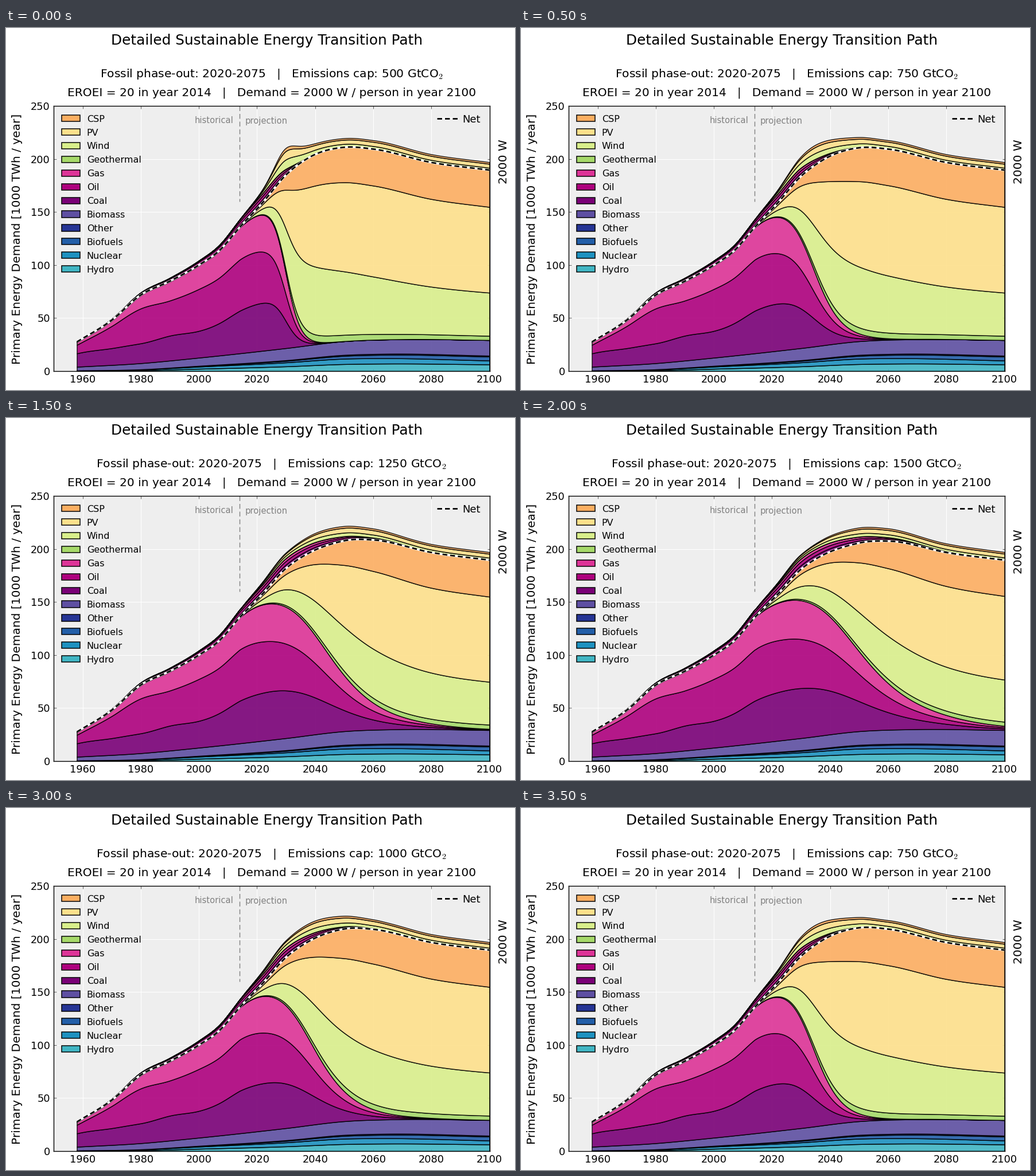
Write a matplotlib script that moves like this. It is 887x632 px and loops after 4000 ms.

```python
import numpy as np
import matplotlib.pyplot as plt
from matplotlib.animation import FuncAnimation
from matplotlib.patches import Rectangle

W, H, DPI = 887, 632, 64
LEFT, RIGHT, TOP, BOTTOM = 83, 842.5, 136, 599

plt.rcParams.update({
    "font.family": "DejaVu Sans",
    "mathtext.fontset": "cm",
    "lines.scale_dashes": False,
    "lines.dash_capstyle": "butt",
})


def px(n):
    """Pixels to points."""
    return n * 72 / DPI


SOURCES = [
    ("Hydro", "#41b6c4"), ("Nuclear", "#1d91c0"), ("Biofuels", "#225ea8"),
    ("Other", "#253494"), ("Biomass", "#5e4fa2"), ("Coal", "#7a0177"),
    ("Oil", "#ae017e"), ("Gas", "#dd3497"), ("Geothermal", "#a6d96a"),
    ("Wind", "#d9ef8b"), ("PV", "#fee08b"), ("CSP", "#fdae61"),
]
COLORS = [c for _, c in SOURCES]

START = 2014
YEARS = np.arange(1958, 2100.1, 0.5)
AHEAD = np.maximum(YEARS - START, 0)


def smooth(points):
    """Cubic Hermite curve through (year, value) points, sampled at YEARS."""
    xs, ys = np.array(points, float).T
    m = np.gradient(ys, xs)
    i = np.clip(np.searchsorted(xs, YEARS, side="right") - 1, 0, len(xs) - 2)
    h = xs[i + 1] - xs[i]
    u = (YEARS - xs[i]) / h
    v = 1 - u
    return (ys[i] * v * v * (1 + 2 * u) + ys[i + 1] * u * u * (3 - 2 * u)
            + h * u * v * (m[i] * v - m[i + 1] * u))


# Net demand and the steady lower sources, in 1000 TWh / year
DEMAND = smooth([(1958, 27.5), (1970, 48), (1980, 71.8), (1990, 84.8),
                 (2000, 100), (2007, 113.5), (2014, 135.5), (2022, 159),
                 (2030, 185), (2038, 201.5), (2050, 211), (2060, 209.3),
                 (2080, 196.7), (2100, 189.5)])
BIO = smooth([(1958, 4), (1980, 7.4), (2000, 12.6), (2030, 21.6),
              (2050, 28.1), (2070, 30), (2100, 29.2)])
OTHER = smooth([(1958, 0.5), (1980, 1.6), (2000, 4.9), (2030, 10.2),
                (2050, 15.2), (2065, 16.3), (2100, 14.5)])
BASE = [0.43 * OTHER, (0.86 - 0.0016 * (YEARS - 1990)) * OTHER,
        0.94 * OTHER, OTHER, BIO]

# Shares within the fossil and within the renewable supply
COAL = smooth([(1958, 0.545), (1970, 0.378), (1980, 0.292), (1990, 0.315),
               (2000, 0.29), (2014, 0.338), (2024, 0.355), (2100, 0.37)])
OIL = smooth([(1958, 0.349), (1970, 0.498), (1980, 0.514), (1990, 0.444),
              (2000, 0.454), (2014, 0.407), (2024, 0.37), (2050, 0.34),
              (2100, 0.31)])
FOSSIL_MIX = [COAL, OIL, 1 - COAL - OIL]

WIND = 0.26 + 0.33 * np.exp(-AHEAD / 30)
CSP = 0.235 - 0.12 * np.exp(-AHEAD / 45)
GEO = 0.09 * WIND
CLEAN_MIX = [GEO, WIND - GEO, 1 - WIND - CSP, CSP]
GEO_COST = 0.04 * WIND
COST_MIX = [GEO_COST, WIND - GEO_COST, 1 - WIND - CSP, CSP]


def fossil_supply(step, net):
    """Growth that levels off, cut by a generalised logistic phase-out."""
    shape = 0.8 - 0.1 * step
    half = 2030 + 4.4 * step + 0.2 * step ** 2
    tail = 2.8 + 3 * step + 0.1 * step ** 2
    width = shape * tail
    middle = half - width * np.log(2 ** (1 / shape) - 1)

    def left(t):
        return (1 + np.exp((t - middle) / width)) ** -shape

    growth = 144.5 - 26 * np.exp(-AHEAD / 11)
    projected = growth * left(YEARS) / left(START)
    history = net - BIO - 0.4
    return np.where(YEARS < START, history, np.minimum(projected, history))


def stack(cap):
    """Tops of the net stack and, above it, of the energy-investment stack."""
    step = (cap - 500) / 250
    dip = 1.75 * step * np.exp(-((YEARS - 2035 - 1.7 * step) / (10 + 1.5 * step)) ** 2)
    net = DEMAND - dip * (YEARS > START)
    fossil = fossil_supply(step, net)
    clean = np.maximum(net - BIO - fossil, 0)

    parts = [s * fossil for s in FOSSIL_MIX] + [s * clean for s in CLEAN_MIX]
    tops = BASE + list(BIO + np.cumsum(parts, axis=0))

    # Running clean plants costs a little, building them costs more.
    build = np.maximum(np.gradient(clean, YEARS), 0)
    build = np.convolve(build, np.ones(7) / 7, "same")
    invest = 0.046 * clean + build
    burn = fossil * np.minimum(0.06 * np.exp((YEARS - START) / 60), 0.077)
    costs = [s * burn for s in FOSSIL_MIX] + [s * invest for s in COST_MIX]
    return tops, net + np.cumsum(costs, axis=0), net


fig = plt.figure(figsize=(W / DPI, H / DPI), dpi=DPI, facecolor="white")
ax = fig.add_axes([LEFT / W, 1 - BOTTOM / H, (RIGHT - LEFT) / W, (BOTTOM - TOP) / H],
                  facecolor="#eeeeee")
ax.set(xlim=(1950, 2100), ylim=(0, 250),
       xticks=range(1960, 2101, 20), yticks=range(0, 251, 50))
ax.set_axisbelow(True)
ax.grid(color="white", lw=px(1), ls="-")
ax.tick_params(direction="in", top=True, right=True, length=px(4.5),
               width=px(0.6), labelsize=px(17.7), pad=px(6))
for spine in ax.spines.values():
    spine.set_linewidth(px(1.4))


def label(x, y, text, size, ha="left", **kw):
    """Text with its baseline at a pixel position from the top left."""
    return fig.text(x / W, 1 - y / H, text, fontsize=px(size), ha=ha,
                    va="baseline", rotation_mode="anchor", **kw)


def data(x, y):
    """Pixel position to axes data."""
    return (1950 + 150 * (x - LEFT) / (RIGHT - LEFT),
            250 * (BOTTOM - y) / (BOTTOM - TOP))


DASH = (0, (px(8.5), px(5)))


def net_line(xs, ys):
    white = ax.plot(xs, ys, color="white", lw=px(3.8), zorder=5,
                    solid_capstyle="butt")
    black = ax.plot(xs, ys, color="black", lw=px(2.7), ls=DASH, zorder=6)
    return white + black


label(454.5, 29, "Detailed Sustainable Energy Transition Path", 24.75, "center")
subtitle = label(463, 85, "", 20.2, "center")
label(463, 118.5, "EROEI = 20 in year 2014   |   Demand = 2000 W / person in year 2100",
      20.15, "center")
label(25.5, 368, "Primary Energy Demand [1000 TWh / year]", 20.15, "center", rotation=90)
label(873, 233.5, "2000 W", 20.15, "center", rotation=90)
label(396, 166.5, "historical", 14.7, "right", color="#808080")
label(417, 166.5, "projection", 14.7, color="#808080")
ax.plot([START, START], [250, 160], color="#808080", lw=px(1.4), ls=DASH)

for k, (name, color) in enumerate(reversed(SOURCES)):
    y = 163.3 + 23.9 * k
    (x0, y0), (x1, y1) = data(97, y), data(129, y - 11.2)
    ax.add_patch(Rectangle((x0, y0), x1 - x0, y1 - y0, fc=color, ec="black",
                           lw=px(1.5), zorder=4))
    label(140.8, y + 0.3, name, 16)

(x0, y0), (x1, _) = data(751, 158.5), data(787, 158.5)
net_line([x0, x1], [y0, y0])
label(795.5, 165, "Net", 17.9)

drawn = []


def fill_bands(floor, tops, colors):
    for top, color in zip(tops, colors):
        drawn.append(ax.fill_between(YEARS, floor, top, facecolor=color,
                                     edgecolor="black", lw=px(1.4),
                                     alpha=0.9, zorder=2))
        floor = top


def update(i):
    while drawn:
        drawn.pop().remove()
    cap = 1500 - 250 * abs(4 - i)
    subtitle.set_text("Fossil phase-out: 2020-2075   |   "
                      f"Emissions cap: {cap} GtCO$_2$")
    tops, extra, net = stack(cap)
    fill_bands(np.zeros_like(YEARS), tops, COLORS)
    fill_bands(net, extra, COLORS[5:])
    drawn.extend(net_line(YEARS, net))
    return drawn


anim = FuncAnimation(fig, update, frames=8, interval=500,
                     repeat=True, repeat_delay=0, blit=False)
plt.show()
```
